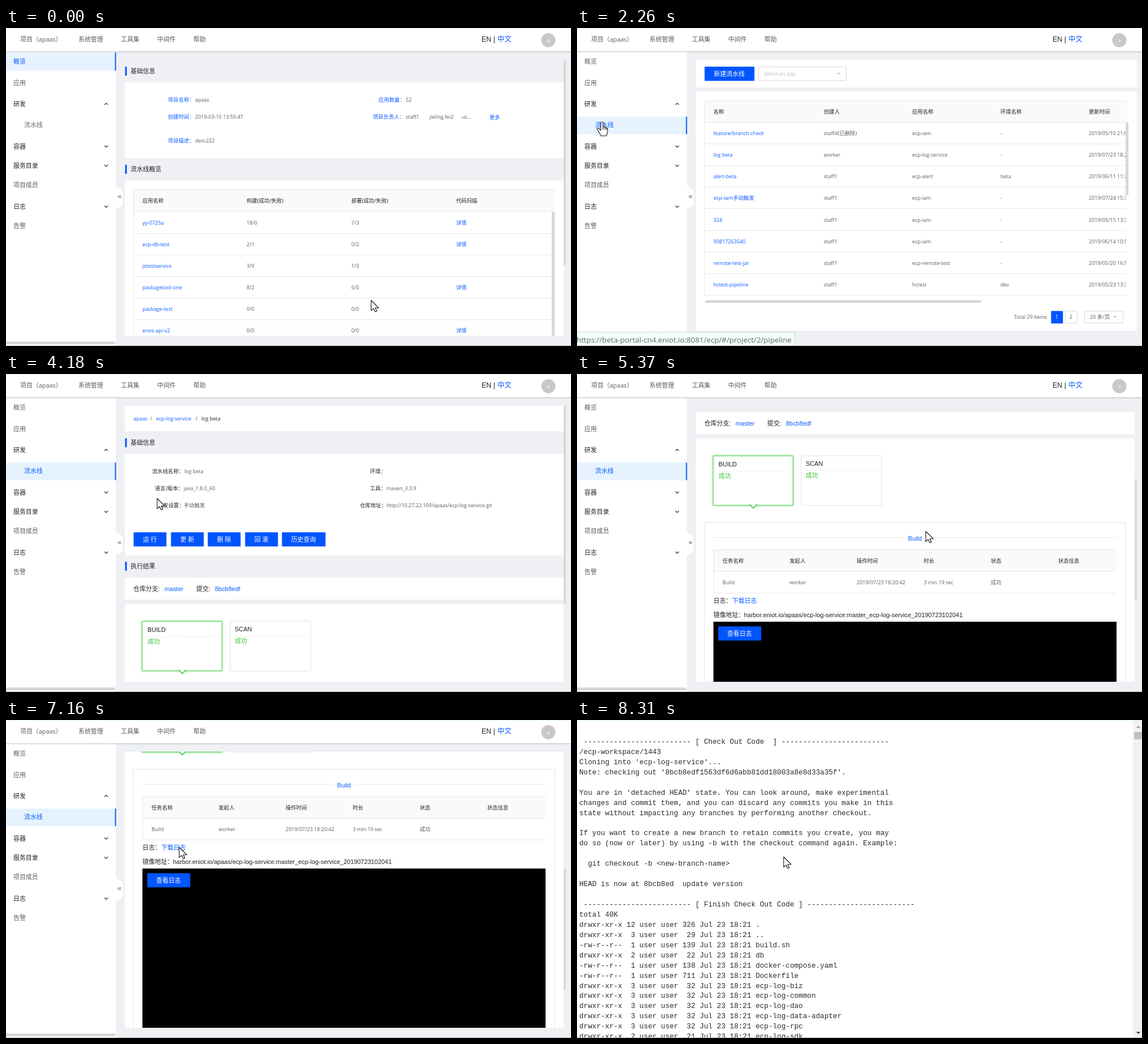
An HTML page for the animation above (8400 ms loop, 998 by 561 pixels).

```html
<!DOCTYPE html>
<html lang="zh-CN">
<head>
<meta charset="utf-8">
<title>Pipeline walkthrough</title>
<style>
html, body { margin: 0; width: 100%; height: 100%; overflow: hidden; background: #fff; }
#stage { position: relative; width: 998px; height: 561px; overflow: hidden; background: #eef0f4; font-family: "Open Sans", "Noto Sans CJK SC", sans-serif; }
#stage div, #stage svg, p { position: absolute; box-sizing: border-box; }
svg { left: 0; top: 0; width: 1px; height: 1px; overflow: visible; fill: none; }
p { margin: -10px 0 0; font-size: 9px; line-height: 20px; white-space: pre; color: #5c5c5c; }
p.zh { font-size: 9.36px; }
p.mid, p.arial { font-size: 10.92px; }
p.arial, p.big { font-family: "Liberation Sans", "Noto Sans CJK SC", sans-serif; }
p.big { font-size: 12.48px; }
p.dark { color: #222; }
p.head { color: #222; font-weight: 500; }
p.blue { color: #0a5cff; }
p.white { color: #fff; font-weight: 500; }
p.pale { color: #bbb; }
p.green { color: #3ec43e; }
p.center { transform: translateX(-50%); }
p.url { font-size: 13.3px; color: #5f6b70; }
.fill { inset: 0; }
.pane { clip-path: inset(56px 0 18px 0); }
.card { background: #fff; }
.btn { background: #05f; border-radius: 1px; transform: translate(.4px, .3px); }
.field { background: #fff; border: 1px solid #d9d9d9; border-radius: 2px; }
.thead { background: #fafafa; border: 1px solid #e8e8e8; border-right: 0; border-radius: 3px 3px 0 0; }
.line { background: #e8e8e8; }
.bar { background: #d8d8da; border-radius: 2px; }
.active { background: #e6f3ff; border-right: 2px solid #0a5cff; transform: translate(.4px, .3px); }
.black { background: #000; }
.dash { border-top: 1px dashed #e8e8e8; }
.stage-box { background: #fff; border: 1px solid #ececec; box-shadow: 0 0 3px #e4e4e4; }
.stage-box.done { border-color: #52cf52; box-shadow: 0 0 4px #7ddc7d; }
.bubble { background: #f3fdfa; border: 1px solid #ccd8d5; border-left: 0; border-radius: 0 3px 0 0; }
.log { left: 4px; top: 30px; margin: 0; color: #2a2a2a; font: 12.66px/17.93px "Liberation Mono", monospace; }

/* 8400 ms loop: 1% = 84 ms */
#stage [class*="t-"] { animation: 8400ms step-end infinite; }
#stage .t-home { animation-name: home; }
#stage .t-homeMenu { animation-name: homeMenu; }
#stage .t-homeText { animation-name: homeText; }
#stage .t-pipeMenu { animation-name: pipeMenu; }
#stage .t-pipeText { animation-name: pipeText; }
#stage .t-list { animation-name: list; }
#stage .t-rows { animation-name: rows; }
#stage .t-detail { animation-name: detail, scroll; }
#stage .t-result { animation-name: result; }
#stage .t-thumb { animation-name: thumb; }
#stage .t-tab { animation-name: tab; }
#stage .t-log { animation-name: log; }
#stage .t-url1 { animation-name: url1; }
#stage .t-url2 { animation-name: url2; }
#stage .t-move { animation-name: move; }
#stage .t-arrow { animation-name: arrow; }
#stage .t-hand { animation-name: hand; }
#stage .t-beam { animation-name: beam; }
.scrolled { transform: translateY(calc(var(--scroll) * -1px)); }
.t-thumb { transform: translateY(calc(var(--scroll) * .4415px)); }

@keyframes home { 0% { opacity: 1 } 22.38%, to { opacity: 0 } }
@keyframes homeMenu { 0% { opacity: 1 } 21.43%, to { opacity: 0 } }
@keyframes homeText { 0% { color: #0a5cff } 21.43%, to { color: #666 } }
@keyframes pipeMenu { 0% { opacity: 0 } 21.43%, to { opacity: 1 } }
@keyframes pipeText { 0% { color: #666 } 9.4%, to { color: #0a5cff } }
@keyframes list { 0% { opacity: 0 } 22.38% { opacity: 1 } 43.57%, to { opacity: 0 } }
@keyframes rows { 0% { opacity: 0 } 25.12%, to { opacity: 1 } }
@keyframes detail { 0% { opacity: 0 } 43.57% { opacity: 1 } 85.95%, to { opacity: 0 } }
@keyframes result { 0% { opacity: 0 } 47.02%, to { opacity: 1 } }
@keyframes scroll {
  0% { --scroll: 0 } 62.14% { --scroll: 100 } 63.02% { --scroll: 200 } 63.92% { --scroll: 292 }
  64.78% { --scroll: 380 } 65.66% { --scroll: 440 } 66.54%, to { --scroll: 467 }
}
@keyframes thumb { 0% { height: 349px } 51.66% { height: 331px } 60%, to { height: 214px } }
@keyframes tab { 0% { opacity: 0 } 85.95%, to { opacity: 1 } }
@keyframes log { 0% { opacity: 0 } 87.97%, to { opacity: 1 } }
@keyframes url1 { 0% { opacity: 0 } 10.23% { opacity: 1 } 34.35%, to { opacity: 0 } }
@keyframes url2 { 0% { opacity: 0 } 77.61% { opacity: 1 } 83.33%, to { opacity: 0 } }
@keyframes move {
  0% { transform: translate(645px, 480px) }
  .83% { transform: translate(645px, 480px); animation-timing-function: steps(11, start) }
  11.18% { transform: translate(42px, 166px) }
  12.85% { transform: translate(44px, 166px) }
  32.5% { transform: translate(44px, 166px); animation-timing-function: steps(10, start) }
  41.76% { transform: translate(267px, 219px) }
  53.81% { transform: translate(267px, 219px); animation-timing-function: steps(6, start) }
  59.09% { transform: translate(616px, 277px) }
  70.35% { transform: translate(616px, 277px); animation-timing-function: steps(7, start) }
  76.75% { transform: translate(306px, 224px) }
  98.92%, to { transform: translate(365px, 241px) }
}
@keyframes arrow {
  0% { opacity: 1 } 10.23% { opacity: 0 } 34.35% { opacity: 1 } 39.88% { opacity: 0 } 43.57% { opacity: 1 }
  75.83% { opacity: 0 } 83.33% { opacity: 1 } 96.19% { opacity: 0 } 98.92%, to { opacity: 1 }
}
@keyframes hand {
  0% { opacity: 0 } 10.23% { opacity: 1 } 34.35% { opacity: 0 } 39.88% { opacity: 1 } 43.57% { opacity: 0 }
  75.83% { opacity: 1 } 83.33%, to { opacity: 0 }
}
@keyframes beam { 0% { opacity: 0 } 96.19% { opacity: 1 } 98.92%, to { opacity: 0 } }
</style>
</head>
<body>
<div id="stage"></div>
<script>
const ROW = 38.15;
const HOST = 'https://beta-portal-cn4.eniot.io:8081/ecp/#/project/2';

const text = (x, y, s, cls = '') =>
  `<p class="${/[\u3000-\u9fff]/.test(s) ? 'zh ' : ''}${cls}" style="left:${x}px;top:${y}px">${s}</p>`;
const box = (x, y, right, bottom, cls, inner = '') =>
  `<div class="${cls}" style="left:${x}px;top:${y}px;width:${right - x}px;height:${bottom - y}px">${inner}</div>`;
const group = (cls, ...parts) => `<div class="fill ${cls}">${parts.join('')}</div>`;
const path = (d, attrs, cls = '') => `<svg class="${cls}"><path d="${d}" ${attrs}/></svg>`;
const chevron = (x, y, up, color = '#333') =>
  path(`M${x - 3} ${y + (up ? 1.5 : -1.5)}l3 ${up ? -3 : 3}l3 ${up ? 3 : -3}`, `stroke="${color}" stroke-width="1.2"`);
const section = (y, title) => box(210, y - 8, 213, y + 8, 'btn') + text(220, y, title, 'mid dark');
const button = (x, y, right, label) =>
  box(x, y, right, y + 25, 'btn') + text((x + right) / 2, y + 12.5, label, 'mid white center');
const header = (cols, y, right, titles) =>
  box(cols[0] - 16, y, right, y + 39, 'thead') + titles.map((s, i) => text(cols[i], y + 20, s, 'head')).join('');
const rows = (cols, y, right, data, linked = true) => data.map((cells, i) => {
  const mid = y + i * ROW;
  return cells.map((s, j) => text(cols[j], mid, s, (linked && !j) || s === '详情' ? 'blue' : '')).join('') +
    box(cols[0] - 16, mid + 18, right, mid + 19, 'line');
}).join('') + box(cols[0] - 16, y - 20, cols[0] - 15, y + data.length * ROW - 20, 'line');
const fields = (list, cls) => list.map(([x, y, label, vx, value]) =>
  text(x, y, label, cls) + text(vx, y, value)).join('');

const menu = [[13, 97, '应用'], [13, 134, '研发', 1], [13, 209, '容器', 1], [13, 243, '服务目录', 1],
  [13, 277, '项目成员'], [13, 315, '日志', 1], [13, 349, '告警']];

const sidebar = box(0, 41, 194, 560, 'card') +
  path('M194 276q1 4 6 6q6 3 6 7v20q0 4-6 7q-5 2-6 6z', 'fill="#fff"') +
  text(197, 297, '«', 'big') +
  box(0, 43, 194, 75, 'active t-homeMenu') + box(0, 156, 194, 187, 'active t-pipeMenu') +
  text(13, 59, '概览', 'mid t-homeText') + text(32, 171, '流水线', 'mid t-pipeText') +
  menu.map(([x, y, s, parent]) => text(x, y, s, parent ? 'mid head' : 'mid') +
    (parent ? chevron(177, y, y === 134) : '')).join('') +
  box(0, 553, 193, 558, 'bar');

const topbar = `<div class="card" style="left:0;top:0;width:998px;height:41px;box-shadow:0 1px 2px #bbb"></div>` +
  [[25, '项目（apaas）'], [128, '系统管理'], [203, '工具集'], [267, '中间件'], [331, '帮助']]
    .map(([x, s]) => text(x, 20, s, 'mid')).join('') +
  text(840, 20, 'EN | ', 'big dark') + text(868, 20, '中文', 'big blue') +
  path('M945.500 21.500a12.500 12.500 0 1 0 25 0a12.500 12.500 0 1 0-25 0', 'fill="#c8c8c8"') +
  text(958, 22, 'a', 'white center');

const homeCols = [241, 425, 610, 795];
const home = group('pane t-home',
  section(76, '基础信息'), box(210, 96, 985, 230, 'card'),
  fields([[286, 127, '项目名称：', 334, 'apaas'], [658, 127, '应用数量：', 706, '52'],
    [286, 157, '创建时间：', 334, '2019-03-15 13:55:47'], [648, 157, '项目负责人：', 706, 'staff1'],
    [286, 199, '项目描述：', 334, 'desc222']], 'blue'),
  text(748, 157, 'jieling.fei2'), text(805, 157, 'us...'), text(854, 158, '更多', 'blue'),
  section(249, '流水线概览'), box(210, 269, 985, 543, 'card'),
  header(homeCols, 285, 969, ['应用名称', '构建(成功/失败)', '部署(成功/失败)', '代码扫描']),
  rows(homeCols, 343.5, 965, [
    ['yy-0725a', '18/0', '7/3', '详情'], ['ecp-db-test', '2/1', '0/2', '详情'],
    ['jstestservice', '3/9', '1/3'], ['packagetool-one', '8/2', '6/0', '详情'],
    ['package-test', '0/0', '0/0'], ['enos-api-v2', '0/0', '0/0', '详情']]),
  box(964, 324, 969, 545, 'bar'), box(985, 56, 989, 419, 'bar'));

const listCols = [241, 436, 592, 748, 904];
const list = group('t-list',
  box(210, 56, 989, 105, 'card'), button(225, 68, 313, '新建流水线'),
  box(320, 68, 476, 93, 'field'), text(330, 81, 'Select an app', 'pale'), chevron(462, 80, false, '#bbb'),
  box(210, 112, 989, 534, 'card'),
  header(listCols, 128, 973, ['名称', '创建人', '应用名称', '环境名称', '更新时间']),
  group('t-rows',
    `<div class="fill" style="clip-path:inset(0 28px 81px 0)">` + rows(listCols, 186, 970, [
      ['feature/branch check', 'staff4(已删除)', 'ecp-iam', '-', '2019/05/10 21:01:12'],
      ['log beta', 'worker', 'ecp-log-service', '-', '2019/07/23 18:20:42'],
      ['alert-beta', 'staff1', 'ecp-alert', 'beta', '2019/06/11 11:32:08'],
      ['ecp-iam手动触发', 'staff1', 'ecp-iam', '-', '2019/07/24 15:31:40'],
      ['324', 'staff1', 'ecp-iam', '-', '2019/05/15 13:30:21'],
      ['90817263540', 'staff1', 'ecp-iam', '-', '2019/06/14 10:52:16'],
      ['remote-test-jar', 'staff1', 'ecp-remote-test', '-', '2019/05/20 16:54:33'],
      ['hctest-pipeline', 'staff1', 'hctest', 'dev', '2019/05/23 13:32:05']]) + '</div>',
    box(969, 167, 974, 295, 'bar'), box(226, 480, 714, 485, 'bar'),
    text(772, 510, 'Total 29 items'), box(837, 499, 858, 521, 'btn'), text(847.5, 510, '1', 'white center'),
    box(862, 499, 884, 521, 'field'), text(872.5, 510, '2', 'center'),
    box(896, 499, 965, 521, 'field'), text(906, 510, '20 条/页'), chevron(950, 509, false, '#bbb')));

const taskCols = [257, 375.5, 494, 612.5, 731, 850];
const detail = group('pane t-detail',
  group('scrolled',
    box(210, 56, 985, 101, 'card'), text(225, 79, 'apaas', 'blue'), text(255, 79, '/'),
    text(265, 79, 'ecp-log-service', 'blue'), text(335, 79, '/'), text(345, 79, 'log beta', 'dark'),
    section(121, '基础信息'), box(210, 141, 985, 320, 'card'),
    fields([[258, 172, '流水线名称：', 315, 'log beta'], [643, 172, '环境：', 672, ''],
      [263, 202, '语言/版本：', 314, 'java_1.8.0_60'], [643, 202, '工具：', 672, 'maven_3.3.9'],
      [268, 232, '触发设置：', 314, '手动触发'],
      [625, 232, '仓库地址：', 672, 'http://10.27.22.109/apaas/ecp-log-service.git']], 'dark'),
    button(225, 279, 283, '运 行'), button(291, 279, 349, '更 新'), button(356, 279, 414, '删 除'),
    button(422, 279, 480, '回 滚'), button(487, 279, 564, '历史查询'),
    section(339, '执行结果'), box(210, 359, 985, 398, 'card'), box(210, 406, 985, 1160, 'card'),
    group('t-result',
      text(225, 379, '仓库分支:', 'arial dark'), text(280, 379, 'master', 'arial blue'),
      text(336, 379, '提交:', 'arial dark'), text(369, 379, '8bcb8edf', 'arial blue'),
      box(240, 436, 382, 524, 'stage-box done'), box(396, 436, 538, 524, 'stage-box'),
      path('M305 522l6.500 6.500l6.500-6.500', 'fill="#fff" stroke="#52cf52" stroke-width="1.8"'),
      text(250, 451, 'BUILD', 'arial dark'), box(250, 463, 372, 464, 'dash'), text(250, 472, '成功', 'mid green'),
      text(404, 450, 'SCAN', 'arial dark'), box(404, 462, 530, 463, 'dash'), text(404, 471, '成功', 'mid green'),
      box(225, 554, 969, 1160, 'stage-box'),
      box(241, 580, 577, 581, 'line'), box(617, 580, 953, 581, 'line'), text(597, 582, 'Build', 'arial blue center'),
      header(taskCols, 602, 953, ['任务名称', '发起人', '操作时间', '时长', '状态', '状态信息']),
      rows(taskCols, 660, 953, [['Build', 'worker', '2019/07/23 18:20:42', '3 min 19 sec', '成功']], false),
      text(241, 692, '日志：', 'arial dark'), text(274, 692, '下载日志', 'arial blue'),
      text(241, 717, '镜像地址：', 'arial dark'),
      text(295, 717, 'harbor.eniot.io/apaas/ecp-log-service:master_ecp-log-service_20190723102041', 'arial dark'),
      box(241, 729, 953, 1140, 'black'), button(249, 737, 325, '查看日志'))),
  box(985, 56, 989, 405, 'bar t-thumb'));

const rule = '-'.repeat(25);
const entry = (dir, links, size, name) =>
  `${dir ? 'drwxr-xr-x' : '-rw-r--r--'} ${String(links).padStart(2)} user user ${String(size).padStart(3)} Jul 23 18:21 ${name}`;
const logLines = [
  ` ${rule} [ Check Out Code  ] ${rule}`,
  '/ecp-workspace/1443',
  "Cloning into 'ecp-log-service'...",
  "Note: checking out '8bcb8edf1563df6d6abb81dd18003a8e8d33a35f'.",
  '',
  "You are in 'detached HEAD' state. You can look around, make experimental",
  'changes and commit them, and you can discard any commits you make in this',
  'state without impacting any branches by performing another checkout.',
  '',
  'If you want to create a new branch to retain commits you create, you may',
  'do so (now or later) by using -b with the checkout command again. Example:',
  '',
  '  git checkout -b &lt;new-branch-name&gt;',
  '',
  'HEAD is now at 8bcb8ed  update version',
  '',
  ` ${rule} [ Finish Check Out Code ] ${rule}`,
  'total 40K',
  entry(1, 12, 326, '.'), entry(1, 3, 29, '..'), entry(0, 1, 139, 'build.sh'), entry(1, 2, 22, 'db'),
  entry(0, 1, 138, 'docker-compose.yaml'), entry(0, 1, 711, 'Dockerfile'),
  ...['biz', 'common', 'dao', 'data-adapter', 'rpc'].map(s => entry(1, 3, 32, 'ecp-log-' + s)),
  entry(1, 2, 21, 'ecp-log-sdk')];

const logTab = group('card t-tab', group('t-log',
  `<p class="log">${logLines.join('\n')}</p>`,
  `<div style="left:982px;top:1px;width:16px;height:560px;background:#f1f1f1"></div>`,
  `<div style="left:984px;top:21px;width:14px;height:13px;background:#c1c1c1"></div>`,
  path('M987.500 14l4-4l4 4z', 'fill="#a3a3a3"'), path('M987.500 550l4 4l4-4z', 'fill="#505050"')));

const bubble = (right, url, cls) => box(0, 536, right, 561, 'bubble ' + cls, text(-1, 13, url, 'url'));
const ink = 'fill="#fff" stroke="#111" stroke-width="1.1" stroke-linejoin="round"';
const cursor = group('t-move',
  path('M0 .5V18.500L4.200 14.800L7.200 20.800L10 19.500L7.200 13.700H13.200Z', ink, 't-arrow'),
  path('M-2 15V2a2 2 0 0 1 4 0v7c.5-1.500 3.500-1 3.500 .8c.6-1 2.700-.6 2.700 1c.7-.8 1.800 0 1.800 1.500v5c0 3-2 4-2 7h-10' +
    'c0-2.500-2.500-4.500-4-8c-1.500-2.500-3.500-4.500-2.300-5.500s3.300 .2 6.300 4.200M2 9v4M5.500 9.800v3.500M8.200 10.800v3', ink, 't-hand'),
  path('M-3.500-8.500h3l.5 .5l.5-.5h3M0-8V8M-3.500 8.500h3l.5-.5l.5 .5h3', 'stroke="#111" stroke-width="1.1"', 't-beam'));

document.getElementById('stage').innerHTML = home + list + detail + sidebar + topbar +
  bubble(385, HOST + '/pipeline', 't-url1') + bubble(331, HOST, 't-url2') + logTab +
  `<div style="left:0;top:0;width:998px;height:1px;background:#dcfaf3"></div>` +
  `<div style="left:0;top:560px;width:998px;height:1px;background:#b8b8b8"></div>` + cursor;
</script>
</body>
</html>
```
